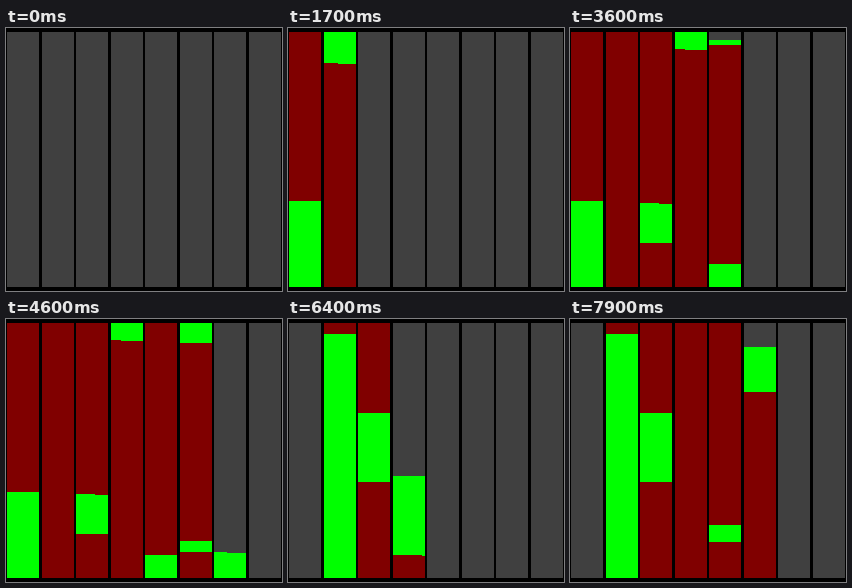
An HTML page with a canvas for the animation above (8000 ms loop, 276x263 px).

```html
<!DOCTYPE html>
<html lang="en">
<head>
<meta charset="utf-8">
<title>Memory regions</title>
<style>
  html, body { margin: 0; width: 100%; height: 100%; overflow: hidden; background: #000; }
  canvas { display: block; }
</style>
</head>
<body>
<canvas id="stage" width="276" height="263"></canvas>
<script>
const FREE = '#404040', DEAD = '#800000', LIVE = '#00ff00';
const REGIONS = 8, ROWS = 255, WIDTH = 32, PITCH = 34.5, LEFT = 1, BOTTOM = 259;
const LOOP = 8000, HOLD = 1000, STEP = 100;

// Each run: end address in rows, number of allocations, whether the object survives.
const beforeCollection = [
  [86, 1, true], [478.45, 6], [510, 1], [554, 1], [593.6, 1, true],
  [900, 8], [936, 1], [1002.3, 2], [1043, 1, true], [1262, 4], [1267, 1],
  [1301, 1], [1312, 1, true], [1510, 7], [1658.6, 4], [1726, 1, true],
  [1878, 3], [1960, 1], [2035, 2]
];
const afterCollection = [
  [606, 3], [675, 1, true], [775, 2], [787.9, 1], [867, 1], [1056, 4],
  [1073, 1, true], [1250, 3], [1461, 6], [1506, 1]
];
const compacted = [{ end: ROWS, color: FREE }, { end: 499, color: LIVE }];

const states = [[]];

// The newest object is always live; older ones die unless they survive.
function allocate(heap, runs) {
  let from = heap.length ? heap[heap.length - 1].end : 0;
  for (const [to, count, survives] of runs) {
    for (let i = 1; i <= count; i++) {
      const wobble = i < count ? 0.3 * Math.sin(states.length * 2.4) : 0;
      const end = from + (to - from) * (i + wobble) / count;
      states.push([...heap, { end, color: LIVE }]);
      heap = [...heap, { end, color: survives ? LIVE : DEAD }];
    }
    from = to;
  }
}
allocate([], beforeCollection);
allocate(compacted, afterCollection);

const ctx = document.getElementById('stage').getContext('2d');

// Memory runs left to right along each row, bottom row first.
function fillTo(end, color) {
  ctx.fillStyle = color;
  for (let i = 0; i < REGIONS; i++) {
    const used = Math.max(0, Math.min(ROWS, end - i * ROWS));
    const full = Math.floor(used);
    const x = Math.round(LEFT + PITCH * i);
    ctx.fillRect(x, BOTTOM - full, WIDTH, full);
    ctx.fillRect(x, BOTTOM - full - 1, Math.round((used - full) * WIDTH), 1);
  }
}

function draw(time) {
  const index = time < HOLD ? 0 : Math.floor((time - HOLD) / STEP) + 1;
  const heap = states[Math.min(index, states.length - 1)];
  ctx.fillStyle = '#000';
  ctx.fillRect(0, 0, 276, 263);
  fillTo(REGIONS * ROWS, FREE);
  for (let i = heap.length - 1; i >= 0; i--) fillTo(heap[i].end, heap[i].color);
}

const start = performance.now();
function tick() {
  draw((performance.now() - start) % LOOP);
  requestAnimationFrame(tick);
}
tick();
</script>
</body>
</html>
```
